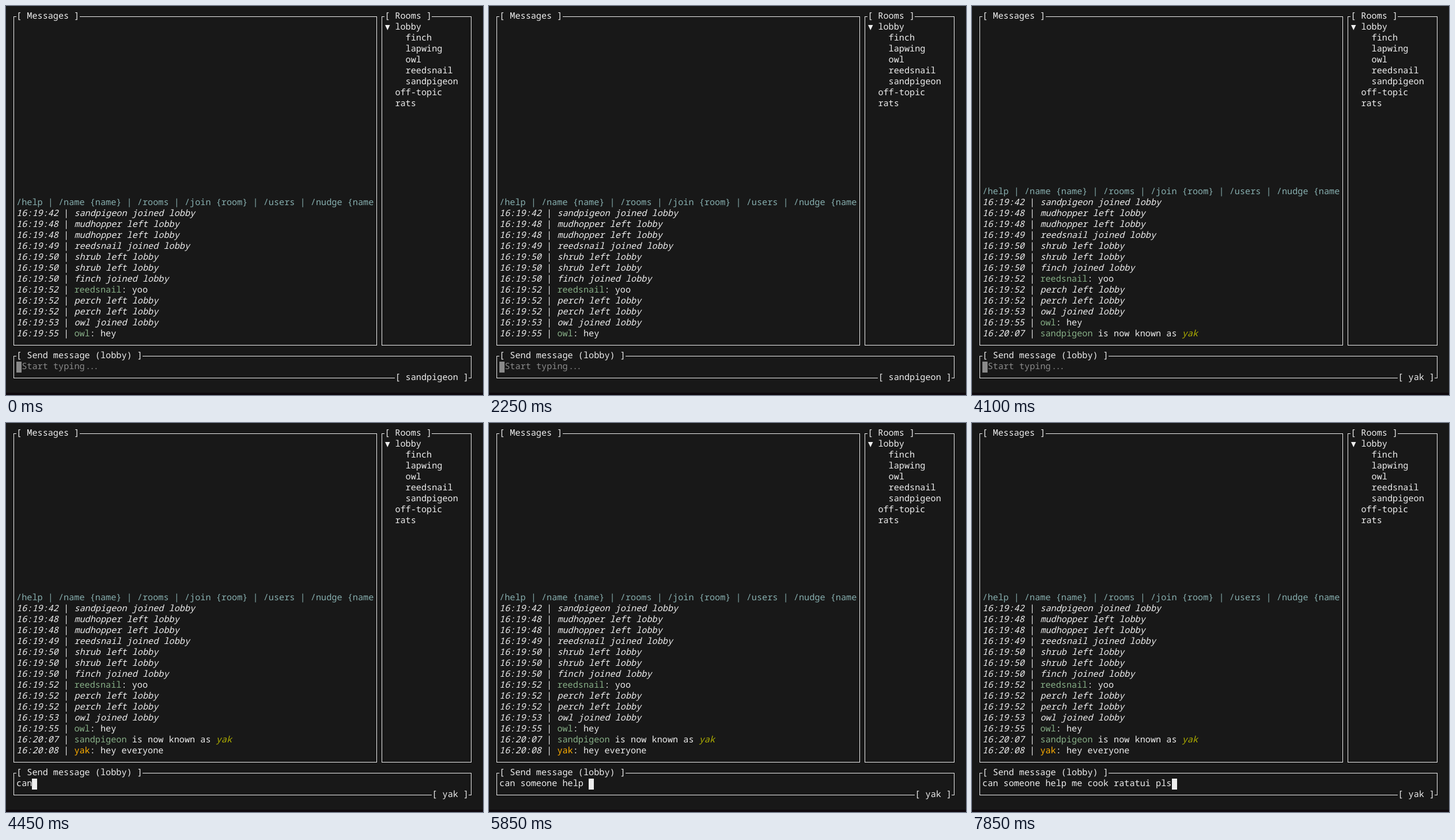
Animation, 828 px wide and 676 px high, one loop 8000 ms. Source, as an HTML page:

```html
<!DOCTYPE html>
<html lang="en">
<head>
<meta charset="utf-8">
<title>Terminal chat</title>
<style>
  html, body { margin: 0; width: 100%; height: 100%; overflow: hidden; background: #181818; }
  #stage {
    position: relative; width: 828px; height: 676px; overflow: hidden;
    background: #181818; color: #eee;
    font: 15.217px/19.03px "Noto Sans Mono", "DejaVu Sans Mono", monospace;
    text-rendering: geometricPrecision; font-variant-ligatures: none;
  }
  #stage div { position: absolute; white-space: pre; box-sizing: border-box; }
  .box { border: 1px solid #eee; }
  .gap { height: 5px; background: #181818; }
  .strip { left: 0; top: 672px; width: 828px; height: 4px; background: #0f090e; }
  .arrow { left: 658px; top: 33px; width: 8.5px; height: 9px; background: #eee; clip-path: polygon(0 0, 100% 0, 50% 100%); }
  .cursor { top: 618px; width: 9px; height: 19px; background: #eee; }
  .idle { background: #8a8a8a; }
  .hint { color: #8a8a8a; }
  .dots { margin-left: 1.4px; letter-spacing: -2.2px; }
  .help { color: #87afaf; }
  .user { color: #87af87; }
  .self { color: #ffaf00; }
  .renamed { color: #afaf00; font-style: italic; }
  i { font-style: italic; }
</style>
</head>
<body>
<div id="stage"></div>
<script>
  const LOOP = 8000, CELL_W = 9.13, CELL_H = 19.03;
  const stage = document.getElementById('stage');
  const colX = c => 8.9 + c * CELL_W;
  const rowY = r => 8.1 + r * CELL_H;

  function add(cls, style = {}) {
    const el = document.createElement('div');
    el.className = cls;
    Object.assign(el.style, style);
    return stage.appendChild(el);
  }

  function text(col, row, html, cls = '') {
    const el = add(cls, { left: colX(col) + 'px', top: rowY(row) + 'px' });
    el.innerHTML = html;
    return el;
  }

  // Borders run through the middle of their character cells.
  function box(col, row, lastCol, lastRow) {
    const midX = c => Math.floor(colX(c + 0.5));
    const midY = r => Math.floor(rowY(r + 0.5) + 0.9);
    const x = midX(col), y = midY(row);
    add('box', {
      left: x + 'px', top: y + 'px',
      width: midX(lastCol) - x + 1 + 'px', height: midY(lastRow) - y + 1 + 'px'
    });
  }

  // A bracketed label that interrupts a border line.
  function label(col, row, name) {
    const str = `[ ${name} ]`;
    const gap = add('gap', {
      left: colX(col) + 'px', top: rowY(row) + 8 + 'px', width: str.length * CELL_W + 'px'
    });
    return [gap, text(col, row, str)];
  }

  const names = { old: 'sandpigeon', now: 'yak' };

  box(0, 0, 69, 30);
  box(70, 0, 87, 30);
  box(0, 31, 87, 33);
  label(1, 0, 'Messages');
  label(71, 0, 'Rooms');
  label(1, 31, 'Send message (lobby)');
  const oldLabel = label(73, 33, names.old);
  const newLabel = label(80, 33, names.now);
  add('strip');
  add('arrow');

  ['lobby', '  finch', '  lapwing', '  owl', '  reedsnail', '  ' + names.old, 'off-topic', 'rats']
    .forEach((room, i) => text(73, i + 1, room));

  const event = (time, msg) => `<i>${time}</i> | <i>${msg}</i>`;
  const joined = (time, who) => event(time, `${who} joined lobby`);
  const left = (time, who) => event(time, `${who} left lobby`);
  const said = (time, who, msg, cls = 'user') =>
    `<i>${time}</i> | <span class="${cls}">${who}</span>: ${msg}`;

  const log = [
    '<span class="help">/help | /name {name} | /rooms | /join {room} | /users | /nudge {name</span>',
    joined('16:19:42', names.old),
    left('16:19:48', 'mudhopper'),
    left('16:19:48', 'mudhopper'),
    joined('16:19:49', 'reedsnail'),
    left('16:19:50', 'shrub'),
    left('16:19:50', 'shrub'),
    joined('16:19:50', 'finch'),
    said('16:19:52', 'reedsnail', 'yoo'),
    left('16:19:52', 'perch'),
    left('16:19:52', 'perch'),
    joined('16:19:53', 'owl'),
    said('16:19:55', 'owl', 'hey'),
    `<i>16:20:07</i> | <span class="user">${names.old}</span> is now known as <span class="renamed">${names.now}</span>`,
    said('16:20:08', names.now, 'hey everyone', 'self')
  ].map(html => text(1, 0, html));

  // One key time per character, in ms; the reply lands shortly after sending.
  const drafts = [
    { text: '/name ' + names.now, send: 2250, reply: 2300,
      keys: [1050, 1550, 1650, 1650, 1750, 1900, 2000, 2050, 2150] },
    { text: 'hey everyone', send: 4100, reply: 4150,
      keys: [2850, 2950, 3050, 3150, 3200, 3350, 3450, 3550, 3700, 3750, 3900, 3950] },
    { text: 'can someone help me cook ratatui pls', send: LOOP, reply: LOOP,
      keys: [4300, 4350, 4400, 4500, 4600, 4700, 4850, 4900, 5050, 5150, 5250, 5300,
        5450, 5500, 5650, 5800, 5850, 5900, 6000, 6050, 6200, 6250, 6400, 6500, 6550,
        6650, 6750, 6900, 7100, 7200, 7250, 7400, 7550, 7700, 7800, 7850] }
  ];

  const hint = text(2, 32, 'Start typing<span class="dots">...</span>', 'hint');
  const input = text(1, 32, '');
  const cursor = add('cursor');
  const show = (el, on) => { el.style.visibility = on ? 'visible' : 'hidden'; };

  function render(t) {
    const draft = drafts.find(d => t >= d.keys[0] && t < d.send);
    const typed = draft ? draft.text.slice(0, draft.keys.filter(k => k <= t).length) : '';
    input.textContent = typed;
    show(hint, !typed);
    cursor.classList.toggle('idle', !typed);
    cursor.style.left = Math.round(colX(1 + typed.length)) + 'px';

    const replies = drafts.filter(d => t >= d.reply).length;
    const count = 13 + replies;
    log.forEach((line, i) => {
      show(line, i < count);
      line.style.top = rowY(30 - count + i) + 'px';
    });
    oldLabel.forEach(el => show(el, !replies));
    newLabel.forEach(el => show(el, replies));
  }

  const start = performance.now();
  function tick() {
    render((performance.now() - start) % LOOP);
    requestAnimationFrame(tick);
  }
  render(0);
  requestAnimationFrame(tick);
</script>
</body>
</html>
```
